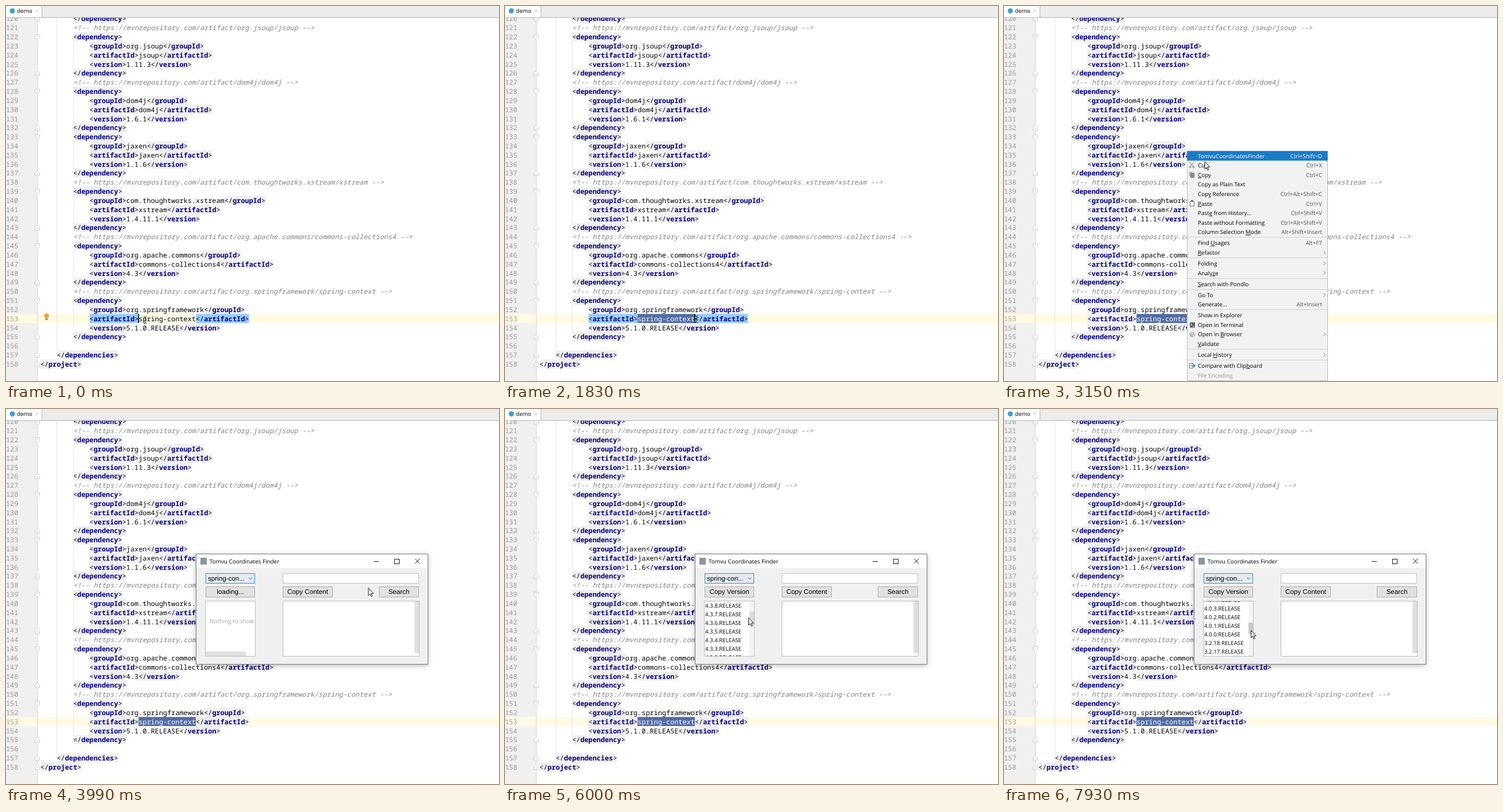
An HTML page for the animation above (8 s loop, 857x653 px).

```html
<!DOCTYPE html>
<html lang="en">
<head>
<meta charset="utf-8">
<title>demo</title>
<style>
  html, body { margin: 0; width: 100%; height: 100%; overflow: hidden; background: #fff; }
  svg { display: block; width: 100vw; height: 100vh; }
  text { text-rendering: geometricPrecision; fill: #000; font: 9.9px "Open Sans", "Noto Sans", sans-serif; }
  .code text { font: 11.85px "Noto Sans Mono", "DejaVu Sans Mono", monospace; }
  .code .name { font-weight: bold; fill: #000080; }
  .code .note { font-style: italic; fill: #808080; }
  .code .num { fill: #999; }
  .code .picked { fill: #fff; }
  .btn text { font: 11.6px "Liberation Sans", Arial, sans-serif; }
  .mid { text-anchor: middle; }
  .keys { text-anchor: end; fill: #505050; }
  .dim text { fill: #999; }
  .row rect { fill: none; }
  .row.on rect { fill: #1a7bc6; }
  .row.on text { fill: #fff; }
  .mn { text-decoration: underline; }
  #list text { font-size: 9.7px; }
  .crisp { shape-rendering: crispEdges; }
  .win { filter: drop-shadow(0 2px 4px rgba(0, 0, 0, .27)); }
</style>
</head>
<body>
<svg id="stage" viewBox="0 0 857 653" preserveAspectRatio="none"></svg>
<script>
const CW = 7.11, X0 = 59.8, PITCH = 15.83;
const lineY = n => 38 + (n - 121) * PITCH;
const rowTop = n => (lineY(n) - 8.3).toFixed(2);
const colX = c => X0 + c * CW;
const esc = s => s.replace(/&/g, '&amp;').replace(/</g, '&lt;').replace(/>/g, '&gt;');
const rect = (x, y, w, h, fill, more = '') =>
  `<rect x="${x}" y="${y}" width="${w}" height="${h}" fill="${fill}" ${more}/>`;
const box = (x, y, w, h, fill, line) => rect(x + .5, y + .5, w - 1, h - 1, fill, `stroke="${line}"`);
const text = (x, y, s, cls = '', more = '') =>
  `<text x="${x.toFixed(2)}" y="${y.toFixed(2)}" class="${cls}" ${more}>${s}</text>`;
const path = (d, stroke, fill = 'none', more = '') =>
  `<path d="${d}" stroke="${stroke}" fill="${fill}" ${more}/>`;

/* ---------- editor ---------- */
const deps = [
  ['org.jsoup', 'jsoup', '1.11.3', 1],
  ['dom4j', 'dom4j', '1.6.1', 1],
  ['jaxen', 'jaxen', '1.1.6', 0],
  ['com.thoughtworks.xstream', 'xstream', '1.4.11.1', 1],
  ['org.apache.commons', 'commons-collections4', '4.3', 1],
  ['org.springframework', 'spring-context', '5.1.0.RELEASE', 1]
];
const PICK = 'spring-context', PICK_COL = 24, PICK_LINE = 153;

function codeLines() {
  const out = [[8, '</dependency>']];
  for (const [group, artifact, version, note] of deps) {
    if (note) out.push([8, `<!-- https://mvnrepository.com/artifact/${group}/${artifact} -->`]);
    out.push([8, '<dependency>'],
      [12, `<groupId>${group}</groupId>`],
      [12, `<artifactId>${artifact}</artifactId>`],
      [12, `<version>${version}</version>`],
      [8, '</dependency>']);
  }
  out.push([0, ''], [4, '</dependencies>'], [0, '</project>']);
  return out;
}

// Background band behind part of a code line.
const band = (n, col, len, fill, more) =>
  rect(colX(col).toFixed(1), rowTop(n), (len * CW).toFixed(1), PITCH, fill, more);

function editor() {
  let back = '', front = '', folds = '';
  codeLines().forEach(([indent, src], i) => {
    const n = 120 + i, y = lineY(n), base = y + 4.2;
    front += text(0, base, n, 'num');
    if (indent === 12) back += rect(117, rowTop(n), 1, PITCH, '#e4e4e4');
    let col = indent;
    for (const [tok, open, name] of src.matchAll(/<!--.*-->|(<\/?)(\w+)>|[^<]+/g)) {
      const x = colX(col);
      if (name) {
        back += band(n, col, tok.length, '#efefef');
        front += text(x, base, esc(open)) + text(colX(col + open.length), base, name, 'name') +
          text(colX(col + tok.length - 1), base, '&gt;');
      } else if (!(n === PICK_LINE && tok === PICK)) {
        front += text(x, base, esc(tok), tok.startsWith('<!--') ? 'note' : '');
      }
      col += tok.length;
    }
    if (indent < 12 && /^<\/?\w/.test(src)) {
      const flip = src[1] === '/' ? -1 : 1;
      folds += `<g transform="translate(54.5 ${y.toFixed(1)}) scale(1 ${flip})">` +
        path('M-4 -4H4V1L0 4.5L-4 1ZM-2 -1H2', '#c6c6c6', '#fff', 'stroke-width=".9"') + '</g>';
    }
  });
  const top = rowTop(PICK_LINE), base = lineY(PICK_LINE) + 4.2;
  return rect(0, 0, 857, 653, '#fff') + rect(0, 0, 54, 653, '#f0f0f0') +
    rect(0, top, 857, PITCH, '#fffae3') + rect(54, 20, 1, 633, '#d6d6d6') +
    rect(88, 20, 1, 580, '#e4e4e4') + back +
    `<g id="pair">${band(PICK_LINE, 12, 12, '#99ccff')}${band(PICK_LINE, 38, 13, '#99ccff')}</g>` +
    band(PICK_LINE, PICK_COL, 0, '#526da5', 'id="sel"') + folds +
    `<g class="code">${front}${text(colX(PICK_COL), base, '', 'picked', 'id="picked"')}` +
    `${text(colX(PICK_COL), base, PICK, '', 'id="rest"')}</g>` +
    rect(0, top, 1.6, PITCH, '#000', 'id="caret"') +
    '<g id="bulb"><circle cx="70.5" cy="539.5" r="4.3" fill="#f2a52c"/>' +
    rect(68.5, 544, 4, 3, '#8c8c8c') + '</g>';
}

function tabs() {
  return rect(0, 0, 857, 20, '#ececec') + rect(0, 0, 62, 20, '#fff') +
    rect(62, 0, 1, 20, '#b4b4b4') + rect(0, 19.6, 857, 1, '#b0b0b0') +
    '<circle cx="11" cy="8.5" r="4.5" fill="#3f9fd3"/>' + text(19, 12, 'demo') +
    path('M51 6L56 11M56 6L51 11', '#bdbdbd');
}

/* ---------- context menu ---------- */
const items = [
  'TomvuCoordinatesFinder|Ctrl+Shift+D', 'Cu_t|Ctrl+X', '_Copy|Ctrl+C', 'Copy as Plain Text',
  'Cop_y Reference|Ctrl+Alt+Shift+C', '_Paste|Ctrl+V', 'Past_e from History...|Ctrl+Shift+V',
  'Paste without Formatting|Ctrl+Alt+Shift+V', 'Column Selection _Mode|Alt+Shift+Insert', '-',
  'Find _Usages|Alt+F7', '_Refactor|>', '-', 'Folding|>', 'Analy_ze|>', '-',
  '_Search with Pondlo', '-', 'Go To|>', 'Generate...|Alt+Insert', '-',
  'Show in Explorer', 'Open in Terminal', 'Open in _Browser|>', '_Validate', '-',
  'Local _History|>', '-', 'Compare with Clip_board', 'File Encoding'
];
const rowY = [];

function menuIcons() {
  const gray = '#6e6e6e';
  return path('M322.5 272L329 279.5M330.5 272L324 279.5', gray) +
    `<g fill="none" stroke="${gray}"><circle cx="323.5" cy="280.5" r="1.5"/><circle cx="329.5" cy="280.5" r="1.5"/></g>` +
    path('M322.5 296V289.5H328.5', gray) + box(324, 291, 7, 8, '#8a8a8a', gray) +
    box(323, 340, 8, 9, '#f7f7f7', gray) + rect(325, 338, 4, 3, gray) +
    rect(323, 551, 9, 9, '#5a6066') + path('M324.5 553L327 555L324.5 557M328 558H330.5', '#fff') +
    '<circle cx="327" cy="572" r="4.7" fill="#b3b3b3"/>' + path('M324 570L328 569L327 573L330 575', '#eee') +
    box(322, 622, 7, 9, '#fff', gray) +
    path('M324 626.5H332M329.5 624L332 626.5L329.5 629', '#2f86c6', 'none', 'stroke-width="1.6"');
}

function menu() {
  let y = 261, rows = '', rules = '';
  for (const item of items) {
    if (item === '-') {
      rules += rect(319, Math.round(y - 8.1), 243, 1, '#cfcfcf');
      y += 2.4;
      continue;
    }
    const [label, keys] = item.split('|');
    const words = label.replace(/_(.)/, '<tspan class="mn">$1</tspan>');
    const right = keys === '>' ? path(`M555.5 ${y - 3}L558.5 ${y}L555.5 ${y + 3}`, '#7c7c7c')
      : keys ? text(553, y + 3.5, keys, 'keys') : '';
    rows += `<g class="row${label === 'File Encoding' ? ' dim' : ''}">` +
      rect(318.5, (y - 8.3).toFixed(1), 244, 16.6, 'none') + text(337, y + 3.5, words) + right + '</g>';
    rowY.push(y);
    y += 16.6;
  }
  return `<g id="menu">${box(318, 252, 245, 401, '#f2f2f2', '#bababa')}${rules}${rows}${menuIcons()}</g>`;
}

/* ---------- dialog ---------- */
function versions() {
  const out = [];
  const run = (base, last, tail = '.RELEASE', bare) => {
    for (let i = last; i >= 0; i--) out.push(bare && !i ? base : `${base}.${i}${tail}`);
  };
  Object.entries({ '5.1': 5, '5.0': 12, '4.3': 22, '4.2': 9, '4.1': 9, '4.0': 9, '3.2': 18, '3.1': 4, '3.0': 7 })
    .forEach(([base, last]) => run(base, last));
  for (let i = 3; i; i--) out.push(`2.5.6.SEC0${i}`);
  Object.entries({ '2.5': 6, '2.0': 8, '1.2': 9, '1.1': 5, '1.0': 2 })
    .forEach(([base, last]) => run(base, last, '', true));
  return out.concat('1.0-rc1');
}

function dialog() {
  const btn = (x, w, label, id = '') =>
    box(x, 309, w, 19, '#e1e1e1', '#adadad') + text(x + w / 2, 322.3, label, 'mid', id);
  const rows = versions().map((v, i) => text(348, 345.2 + 15 * i, v)).join('');
  return '<clipPath id="clip"><rect x="347" y="335" width="86" height="95"/></clipPath><g id="dialog">' +
    `<g class="win">${box(330, 252, 404, 193, '#f0f0f0', '#7c7c7c')}</g>` +
    rect(331, 253, 402, 24, '#fff') + rect(338, 259, 11, 12, '#8996a3') +
    text(354, 268.6, 'Tomvu Coordinates Finder') +
    `<g class="crisp">${path('M639 265.5H648M675.5 261.5H683.5V269.5H675.5Z', '#111')}</g>` +
    path('M711 260.7L719.5 269.2M719.5 260.7L711 269.2', '#111') +
    '<g class="btn">' + box(347, 286, 86, 18, '#e5ebf0', '#2b8fd8') + text(351, 299.2, 'spring-con...') +
    path('M422 293.5L425 296.5L428 293.5', '#555') + box(481, 286, 237, 18, '#fff', '#c0c0c0') +
    btn(347, 86, 'loading...', 'id="load"') + btn(481, 87, 'Copy Content') + btn(648, 70, 'Search') + '</g>' +
    box(481, 334, 238, 97, '#fff', '#bcbcbc') + rect(710, 335, 8, 90, '#e0e0e0') +
    box(346, 334, 88, 97, '#fff', '#bcbcbc') + '<g clip-path="url(#clip)">' +
    '<g id="empty">' + text(354, 373.4, 'Nothing to show', '', 'style="fill:#9ba8a1;font-size:10.1px"') +
    rect(347, 422, 70, 8, '#e0e0e0') + '</g>' +
    `<g id="full"><g id="list">${rows}</g>${rect(425, 335, 8, 95, '#f3f3f3')}` +
    rect(425, 335, 8, 20, '#dcdcdc', 'id="thumb"') + '</g></g></g>';
}

const pointers =
  `<g id="beam">${path('M-2.5 -6Q0 -6 0 -4.5Q0 -6 2.5 -6M0 -5V5M-2.5 6Q0 6 0 4.5Q0 6 2.5 6', '#222')}</g>` +
  `<g id="arrow">${path('M.5 .5V13.5L3.3 10.7L5.5 15.4L7.3 14.6L5.2 10H9.3Z', '#000', '#fff', 'stroke-width=".9"')}</g>`;

const el = id => document.getElementById(id);
el('stage').innerHTML = editor() + tabs() + menu() + dialog() + pointers;

/* ---------- motion ---------- */
const LOOP = 8000, STEP = 77;
const bursts = [[70, 370], [520, 1290], [1370, 1600], [1830, 1910], [2060, 2060], [2210, 2380],
  [2610, 3150], [3380, 4150], [4220, 4760], [5310, 5460], [5690, 6460], [6540, 7310], [7610, 7610], [7780, 7930]];
const mouse = [[0, 242, 547], [370, 235, 546], [520, 233, 546], [1290, 332, 545], [1830, 333, 545.5],
  [1910, 322, 547], [2060, 318.5, 543], [2540, 319, 542], [3150, 348.5, 270], [3300, 348.5, 270],
  [3990, 629, 311], [4150, 642, 314], [4760, 423, 345], [5230, 423, 345], [5460, 423, 353],
  [6000, 423, 363], [6460, 428, 391], [7000, 429, 414], [7310, 429, 421], [7610, 429, 422],
  [7700, 429, 422], [7930, 429, 385]];
const scroll = [[5230, 0], [5460, 230], [6000, 495], [6460, 1200], [7000, 1858], [7310, 2040], [7700, 2040], [7930, 1014]];

// The picture ticks only inside bursts and holds between them.
function tick(t) {
  let r = 0;
  for (const [a, b] of bursts)
    if (t >= a) r = Math.min(b, a + Math.floor((t - a + 8) / STEP) * STEP);
  return r;
}

function along(keys, t) {
  const i = keys.findIndex(k => k[0] > t);
  if (i === 0) return keys[0].slice(1);
  if (i < 0) return keys[keys.length - 1].slice(1);
  const a = keys[i - 1], b = keys[i], f = (t - a[0]) / (b[0] - a[0]);
  return a.slice(1).map((v, k) => v + (b[k + 1] - v) * f);
}

const show = (id, on) => { el(id).style.display = on ? '' : 'none'; };
const rows = [...document.querySelectorAll('.row')];

function draw(now) {
  const t = now % LOOP, q = tick(t);
  const [x, y] = along(mouse, q);

  const start = colX(PICK_COL), all = PICK.length;
  const n = t < 520 ? 0 : t < 1290 ? Math.max(0, Math.min(all, Math.round((x - start) / CW))) : all;
  el('sel').setAttribute('width', n * CW);
  el('picked').textContent = PICK.slice(0, n);
  el('rest').textContent = PICK.slice(n);
  el('rest').setAttribute('x', start + n * CW);
  el('caret').setAttribute('x', start + n * CW - .8);
  show('caret', t < 2210);
  show('bulb', t < 520);
  show('pair', t < 520 || (t >= 1450 && t < 2210));

  show('menu', t >= 2290 && t < 3380);
  rows.forEach((r, i) => r.classList.toggle('on', q >= 2610 && Math.abs(y - 2 - rowY[i]) < 8.3));

  const loaded = t >= 4450;
  show('dialog', t >= 3610);
  show('empty', !loaded);
  show('full', loaded);
  el('load').textContent = loaded ? 'Copy Version' : 'loading...';
  const [s] = along(scroll, q);
  el('list').setAttribute('transform', `translate(0 ${-Math.round(s)})`);
  el('thumb').setAttribute('y', 335 + s * .0365);
  el('thumb').setAttribute('fill', t < 6540 ? '#dcdcdc' : '#c9c9c5');

  const typing = t < 2290;
  show('beam', typing);
  show('arrow', !typing);
  el(typing ? 'beam' : 'arrow').setAttribute('transform', `translate(${x.toFixed(1)} ${y.toFixed(1)})`);
}

const t0 = performance.now();
function frame() {
  draw(performance.now() - t0);
  requestAnimationFrame(frame);
}
draw(0);
requestAnimationFrame(frame);
</script>
</body>
</html>
```
